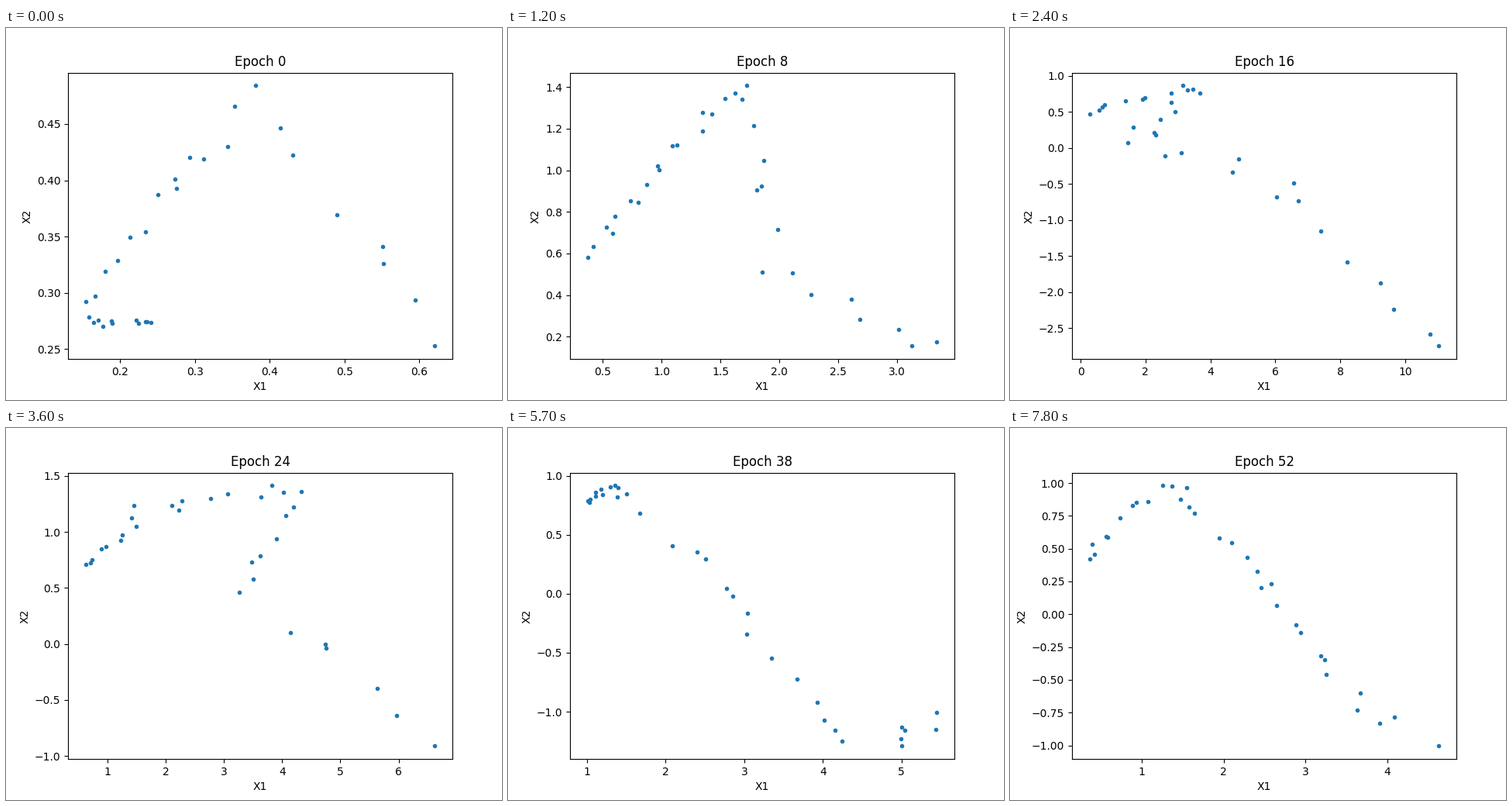
A matplotlib script that plays this animation: 640 by 480 pixels, repeating every 8 s.

```python
import numpy as np
import matplotlib.pyplot as plt
from matplotlib.animation import FuncAnimation

INTERVAL = 100       # ms per animation step
STEPS_PER_PLOT = 3   # the plot is refreshed every 300 ms
EPOCHS_PER_PLOT = 2
STEPS = 80
SAMPLES = 32

# The path the cloud follows at a few epochs; it also sets the cloud's extent.
PATHS = {
    0: [(.25, .27), (.1536, .265), (.25, .39), (.385, .4842), (.6209, .2525)],
    8: [(.37, .573), (1.1, 1.07), (1.65, 1.407), (1.9, .45), (3.34, .1547)],
    16: [(.275, .56), (3.65, .8655), (1.67, .19), (6.5, -.5), (11.035, -2.751)],
    24: [(.62, .68), (1.7, 1.27), (4.4, 1.413), (3.5, .5), (6.625, -.912)],
    38: [(1.005, .8), (1.38, .918), (2.9, -.1), (4.31, -1.292), (5.45, -1.16)],
    46: [(.583, .6), (1.5, .988), (2.38, .45), (4.17, -.654), (4.906, -.5)],
    52: [(.361, .375), (1.33, .98), (2.4, .335), (3.3, -.25), (4.631, -1.005)],
}


def path_at(epoch):
    """Blend the neighbouring paths, slowly at first."""
    keys = list(PATHS)
    i = min(np.searchsorted(keys, epoch, side="right") - 1, len(keys) - 2)
    start, end = keys[i], keys[i + 1]
    t = ((epoch - start) / (end - start)) ** 2
    return (1 - t) * np.array(PATHS[start]) + t * np.array(PATHS[end])


def samples_at(epoch):
    """Scatter samples along the path, denser at its start, and fit its extent."""
    rng = np.random.default_rng(epoch)
    path = path_at(epoch)
    low, high = path.min(axis=0), path.max(axis=0)

    u = np.linspace(0, 1, SAMPLES)
    u[1:-1] += rng.uniform(-.025, .025, SAMPLES - 2)
    place = (len(path) - 1) * u ** 1.2
    points = np.column_stack([np.interp(place, range(len(path)), axis)
                              for axis in path.T])
    spread = (.006 + .025 * u)[:, None] * (high - low)
    points += rng.normal(size=points.shape) * spread

    nearest, farthest = points.min(axis=0), points.max(axis=0)
    return low + (points - nearest) / (farthest - nearest) * (high - low)


fig, ax = plt.subplots(figsize=(6.4, 4.8), dpi=100)


def draw(step):
    epoch = step // STEPS_PER_PLOT * EPOCHS_PER_PLOT
    x, y = samples_at(epoch).T
    ax.clear()
    ax.plot(x, y, ".")
    ax.set_title(f"Epoch {epoch}")
    ax.set_xlabel("X1")
    ax.set_ylabel("X2")
    return []


animation = FuncAnimation(fig, draw, frames=STEPS, interval=INTERVAL,
                          repeat=True, repeat_delay=0)
plt.show()
```
